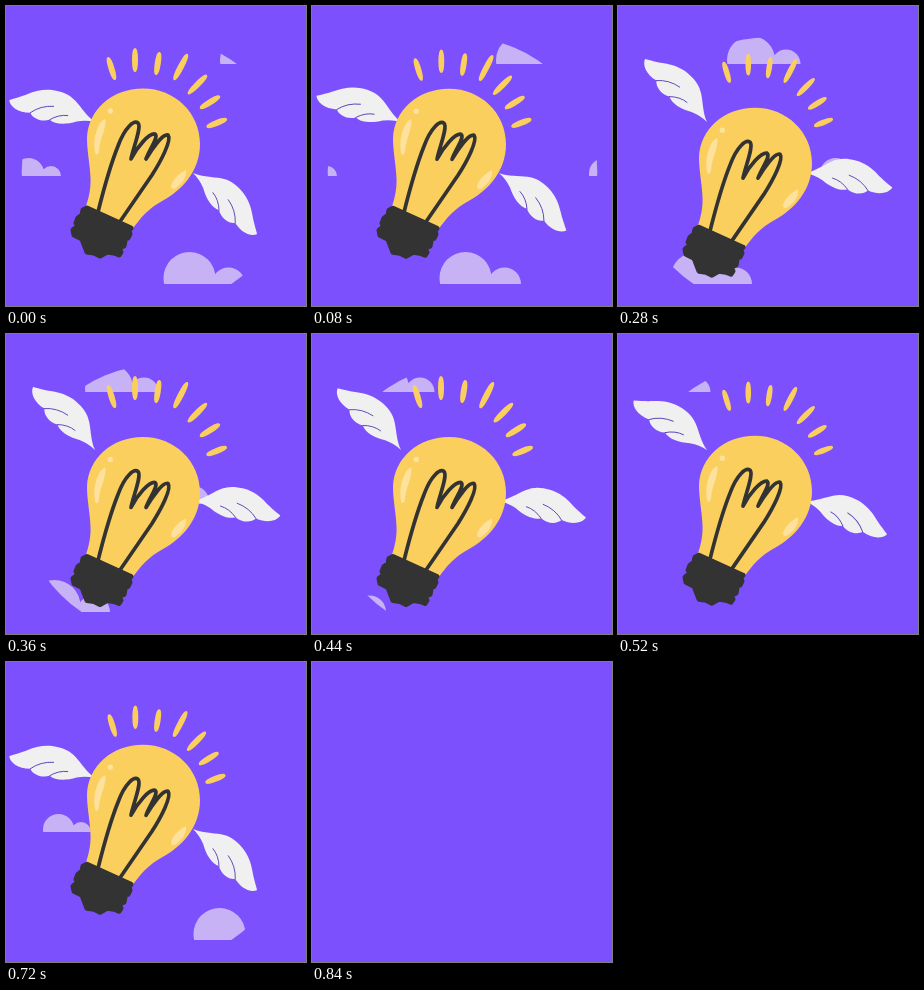
Write an HTML page with a canvas that moves like this. It is 300 px wide and 300 px high and loops after 0.88 s.

```html
<!DOCTYPE html>
<html lang="en">
<head>
<meta charset="utf-8">
<title>Flying light bulb</title>
<style>
  html, body { margin: 0; width: 100%; height: 100%; overflow: hidden; background: #7d50fe; }
  canvas { display: block; }
</style>
</head>
<body>
<canvas id="stage" width="300" height="300"></canvas>
<script>
const ctx = document.getElementById('stage').getContext('2d');
const LOOP = 880, CYCLE = 800, STEP = 40;
const PURPLE = '#7d50fe', CLOUD = '#c6b2f4', YELLOW = '#fbcf5d', SHINE = '#fde19d',
      DARK = '#333333', WING = '#f0f0f1', FEATHER = '#5a45b4';

const wingShape = new Path2D(`M0 0C9-3 17-11 24-15.5S38-21.5 48-20.5S66-15 72-10.5S82-4 88.5 0
  C86 6 77 10 65 7C61 12 52 13.5 44.5 9C38 12.5 27 9.5 18 4Q9 0 0 0Z`);
const feathers = new Path2D('M65 7Q57-2.5 44-5M44.5 9Q37 1.5 28 .5');
const glass = new Path2D(`M79 203C83 192 85 182 84.5 172C84 158 81 146 81 132
  C82 104 106 82.5 137 82.5C169 82.5 194 107 194 138C194 165 176 184 157 194.5
  C143 202 134 212 126 224Z`);
const shines = new Path2D(`M98.5 113C91 117 86 135 89.5 148Q92 150 93 145
  C94 132 100 124 99.5 114ZM180 164C172 167 165 176 165 181Q167 185 171 181
  C177 177 181 170 180 164ZM107 105a2.7 2.7 0 1 1-5.4 0a2.7 2.7 0 1 1 5.4 0Z`);
const filament = new Path2D(`M92 206C98 182 104 160 112 140C119 121 128 114 132 117
  C136 121 127 142 125 153C131 141 143 127 149 128C153 131 144 142 140 153
  C146 143 157 127 162 129C166 134 155 155 146 169L113 217`);
const socket = new Path2D(`M81 202L77 204L76 209L72 212L70 217L72 220L67 224L68 229L76 233
  L81 246L88 247L94 250L101 246L108 247L113 249L115 246L113 242L118 240L119 235L117 233
  L122 232L124 228L123 225L125 222Z`);

// Outer and inner end of each ray
const rays = [
  [102, 51, 109, 74], [129, 42, 129, 66], [153.5, 46, 150, 69], [181.5, 48, 168, 74],
  [201, 69, 182, 88], [214, 90, 194, 102.5], [221, 113, 200.5, 121]
];

// Start x, baseline, and two humps as [x, y, radius] from the cloud's left corner
const clouds = [
  { x: 214, y: 58, humps: [[24, -4, 24], [59, 0, 14.5]] },
  { x: 307, y: 170, humps: [[15.5, -2.5, 15.5], [38, 0, 10]] },
  { x: 157.5, y: 278, humps: [[26, -6, 26], [65, 0, 16.5]] }
];

const ease = p => {
  p = Math.min(1, Math.max(0, p));
  return p < .5 ? 8 * p ** 4 : 1 - 8 * (1 - p) ** 4;
};
// Goes 0 -> 1 -> 0 over one period
const swing = (t, period) => ease(1 - Math.abs(1 - 2 * (t % period) / period));
const flap = t => {
  const u = (t + 25) % CYCLE;
  return u < 320 ? ease(u / 320) : 1 - ease((u - 355) / 410);
};

function fill(path, color) {
  ctx.fillStyle = color;
  ctx.fill(path);
}

function stroke(path, color, width) {
  ctx.strokeStyle = color;
  ctx.lineWidth = width;
  ctx.stroke(path);
}

function drawClouds(t) {
  ctx.save();
  ctx.beginPath();
  ctx.arc(150.5, 166, 134.8, 0, 7);
  ctx.clip();
  ctx.fillStyle = CLOUD;
  for (const { x, y, humps } of clouds) {
    const left = (x - t * .375 + 320) % 300 - 20;
    ctx.save();
    ctx.beginPath();
    ctx.rect(0, 0, 300, y);
    ctx.clip();
    ctx.beginPath();
    for (const shift of [-300, 0, 300]) {
      for (const [hx, hy, r] of humps) {
        const cx = left + shift + hx;
        ctx.moveTo(cx + r, y + hy);
        ctx.arc(cx, y + hy, r, 0, 7);
      }
    }
    ctx.fill();
    ctx.restore();
  }
  ctx.restore();
}

function drawWing(x, y, side, degrees) {
  ctx.save();
  ctx.translate(x, y);
  ctx.scale(side, 1);
  ctx.rotate(degrees * Math.PI / 180);
  fill(wingShape, WING);
  stroke(feathers, FEATHER, .9);
  ctx.restore();
}

function drawRays(t) {
  const s = 1 - .1 * swing(t, CYCLE / 2);
  ctx.save();
  ctx.translate(145, 110);
  ctx.scale(s, s);
  ctx.translate(-145, -110);
  ctx.fillStyle = ctx.strokeStyle = YELLOW;
  ctx.lineWidth = 3;
  for (const [x1, y1, x2, y2] of rays) {
    const dx = x2 - x1, dy = y2 - y1, half = Math.hypot(dx, dy) / 2;
    ctx.beginPath();
    ctx.ellipse((x1 + x2) / 2, (y1 + y2) / 2, half - 1.5, 1.5, Math.atan2(dy, dx), 0, 7);
    ctx.fill();
    ctx.stroke();
  }
  ctx.restore();
}

function drawBulb(t) {
  ctx.save();
  ctx.translate(0, 20.5 * swing(t, CYCLE));
  fill(glass, YELLOW);
  fill(shines, SHINE);
  stroke(filament, DARK, 3.7);
  fill(socket, DARK);
  stroke(socket, DARK, 5);
  ctx.restore();
}

function draw(now) {
  const t = Math.floor(now % LOOP / STEP) * STEP;
  ctx.fillStyle = PURPLE;
  ctx.fillRect(0, 0, 300, 300);
  if (t <= CYCLE) {
    const lift = flap(t);
    drawClouds(t);
    drawWing(89, 116, -1, -14.3 - 31.2 * lift);
    drawWing(187, 167, 1, 43.6 - 34.2 * lift);
    drawRays(t);
    drawBulb(t);
  }
}

ctx.lineCap = ctx.lineJoin = 'round';
const start = performance.now();
function tick() {
  draw(performance.now() - start);
  requestAnimationFrame(tick);
}
tick();
</script>
</body>
</html>
```
